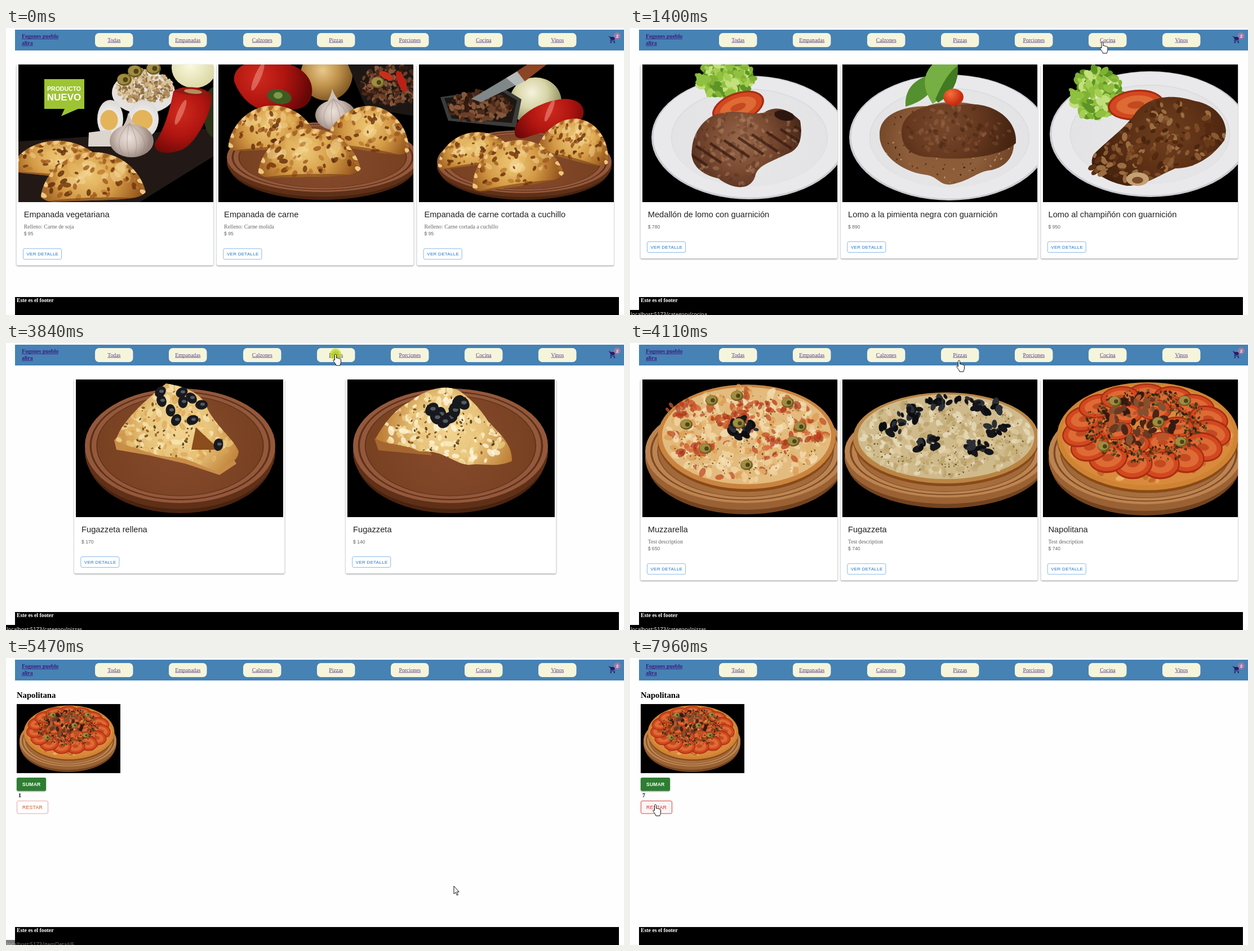
Animation of 1097 by 511 pixels, one loop 8 s. Source, as an HTML page with a canvas:

```html
<!DOCTYPE html>
<html lang="es">
<head>
<meta charset="utf-8">
<title>Menú</title>
<style>
html, body { margin: 0; width: 100%; height: 100%; overflow: hidden; background: #fff; }
canvas { display: block; }
</style>
</head>
<body>
<canvas id="stage" width="1097" height="511"></canvas>
<script>
const LOOP = 8000;
const SERIF = '"Liberation Serif", serif', SANS = '"Liberation Sans", sans-serif';
let g = document.getElementById('stage').getContext('2d');
let seed = 1;
const random = () => (seed = seed * 16807 % 2147483647) / 2147483647;
const clamp = v => Math.max(0, Math.min(1, v));

// ---- drawing helpers ----
function oval(x, y, rx, ry, color, turn = 0) {
  g.beginPath();
  g.ellipse(x, y, rx, ry, turn, 0, 7);
  g.fillStyle = color;
  g.fill();
}
function shape(d, color) {
  g.fillStyle = color;
  g.fill(new Path2D(d));
}
function glow(x, y, r, ...colors) {
  const fill = g.createRadialGradient(x, y, 0, x, y, r);
  colors.forEach((c, i) => fill.addColorStop(i / (colors.length - 1), c));
  return fill;
}
function scatter(n, x, y, rx, ry, size, colors) {
  for (let i = 0; i < n; i++) {
    const a = random() * 6.283, r = Math.sqrt(random()), s = size * (.5 + random() * .7);
    oval(x + rx * r * Math.cos(a), y + ry * r * Math.sin(a), s, s * .6, colors[i % colors.length], random() * 3);
  }
}
function clipped(d, draw) {
  g.save();
  g.clip(new Path2D(d));
  draw();
  g.restore();
}
function box(x, y, w, h, r, fill, stroke) {
  g.beginPath();
  g.roundRect(x, y, w, h, r);
  if (fill) { g.fillStyle = fill; g.fill(); }
  if (stroke) { g.strokeStyle = stroke; g.lineWidth = .9; g.stroke(); }
}
function text(s, x, y, font, color, { align = 'left', line = false, spacing = 0 } = {}) {
  g.font = font;
  g.fillStyle = color;
  g.textAlign = align;
  g.letterSpacing = spacing + 'px';
  g.fillText(s, x, y);
  if (line) {
    const w = g.measureText(s).width;
    g.fillRect(align === 'center' ? x - w / 2 : x, y + 1, w, .8);
  }
}

// ---- food ----
const BLACK_OLIVE = ['#15161a', '#2c2f36', '#0c0d10'];
const MEAT = ['#4a2a1a', '#6b4028', '#321a10', '#85573a'];
const HERBS = ['#7a5a2c', '#5d4a22', '#94632b'];
// side, lower side, rim, groove, face centre, face edge
const DARK_WOOD = ['#5f3018', '#4a230f', '#94583a', '#5d301c', '#874a2d', '#75401f'];
const LIGHT_WOOD = ['#9a6234', '#74431f', '#bd8450', '#7d4a26', '#b07845', '#9c6436'];

function board(x, y, rx, ry, depth, [side, low, rim, groove, centre, edge]) {
  oval(x, y + depth, rx * .98, ry, low);
  oval(x, y + depth * .6, rx, ry, side);
  oval(x, y, rx, ry, rim);
  oval(x, y, rx * .95, ry * .95, groove);
  oval(x, y, rx * .93, ry * .93, rim);
  oval(x, y, rx * .88, ry * .88, groove);
  oval(x, y, rx * .87, ry * .87, glow(x, y, rx, centre, edge));
}
function plate(x, y, rx, ry) {
  oval(x, y, rx, ry, '#cbccd0');
  oval(x, y - 1, rx * .98, ry * .98, '#e9e9eb');
  oval(x, y, rx * .8, ry * .79, '#dcdde0');
  oval(x, y + 1, rx * .79, ry * .78, glow(x, y, rx, '#e8e8e9', '#e2e2e4'));
}
function empanada(x, y, w, h, turn = 0) {
  const body = 'M0 45C3 20 26 0 50 0C76 0 96 20 100 43C94 50 82 49 70 50H26C16 50 6 52 0 45Z';
  g.save();
  g.translate(x, y);
  g.rotate(turn);
  g.scale(w / 100, h / 50);
  g.translate(-50, -25);
  shape(body, glow(46, 24, 55, '#edc878', '#d49a45', '#8f4f18'));
  clipped(body, () => {
    scatter(20, 50, 22, 40, 15, 7, ['#f7e2a966', '#e9bc6466']);
    scatter(46, 50, 28, 47, 22, 3.6, ['#7a3b10dd', '#a05a1ecc', '#5f2b0bcc', '#b9772fbb']);
    for (let i = 0; i <= 22; i++) {
      const a = Math.PI * (1 + i / 22), cx = 50 + 48 * Math.cos(a), cy = 43 + 41 * Math.sin(a);
      oval(cx, cy, 4, 2.4, i % 2 ? '#a9692a' : '#eec681', a + .6);
    }
    oval(50, 52, 50, 5, '#70390f99');
  });
  g.restore();
}
function olive(x, y, r = 10) {
  oval(x, y, r, r * .85, '#6f5f22');
  oval(x - 1, y - 1, r * .85, r * .7, '#a08d42');
  oval(x + 2, y, r * .35, r * .35, '#4d4316');
}
function pepper(d, x, y, r) {
  shape(d, glow(x, y, r, '#cf2a1e', '#b01510', '#650706'));
  clipped(d, () => oval(x, y, r * .06, r * .28, '#ef9a8a88', .4));
}
function garlic(x, y, r) {
  shape(`M${x - 6} ${y - r * 1.3}Q${x} ${y - r * .7} ${x + r} ${y}H${x - r}Q${x - 10} ${y - r * .6} ${x - 6} ${y - r * 1.3}Z`, '#cdbfb4');
  oval(x, y, r, r * .75, glow(x - 5, y - 6, r, '#ebe2dc', '#d0c1b8', '#97857d'));
  g.strokeStyle = '#9a858066';
  g.lineWidth = 1.5;
  for (const k of [-.6, -.2, .25, .65]) g.stroke(new Path2D(`M${x - 4} ${y - r * .8}Q${x + r * k * 1.5} ${y} ${x + r * k * .6} ${y + r * .65}`));
}
function lettuce(x, y, rx, ry) {
  scatter(190, x, y, rx, ry, 9, ['#7fb234', '#a4cf52', '#5d9425', '#c2e07c', '#8fc03f']);
}
function tomatoSlice(x, y, rx, ry, turn = 0) {
  oval(x, y, rx, ry, '#a82c12', turn);
  oval(x, y, rx * .93, ry * .88, '#d2481f', turn);
  oval(x, y, rx * .7, ry * .62, '#de6a35', turn);
  oval(x, y, rx * .3, ry * .24, '#c24a20', turn);
}
function roundPizza(x, y, rx, ry, edge, cheese) {
  oval(x, y + 5, rx, ry, '#8a4a18');
  oval(x, y, rx, ry, edge);
  oval(x, y - 2, rx * .95, ry * .93, cheese);
}

function photo(draw) {
  const canvas = document.createElement('canvas'), main = g;
  canvas.width = 368;
  canvas.height = 245;
  g = canvas.getContext('2d');
  seed = 77;
  g.fillRect(0, 0, 368, 245);
  draw();
  g = main;
  return canvas;
}

const veggie = photo(() => {
  shape('M0 137L368 112V150L215 245H0Z', '#221916');
  oval(312, 6, 40, 36, glow(305, 0, 45, '#fbfae0', '#dcd9a4'));
  oval(348, 85, 20, 45, '#2b3418');
  oval(222, 50, 56, 38, '#e4e1de');
  scatter(330, 224, 40, 50, 30, 4, ['#cdb083', '#b08d5c', '#dcc79d', '#8f6f43']);
  [[207, 12], [188, 27], [240, 7]].forEach(([x, y]) => olive(x, y, 13));
  [[163, 97, 23], [222, 97, 27]].forEach(([x, y, r]) => {
    oval(x, y, r, 34, glow(x, y, 40, '#fbfafa', '#d5d2cf'));
    oval(x - 2, y + 2, r * .68, 18, '#e4b45a');
  });
  pepper('M275 48C285 38 325 36 341 52C350 72 318 140 290 152C262 162 240 158 242 140C258 118 268 85 275 48Z', 288, 85, 85);
  shape('M277 48Q305 35 339 52Q312 60 277 48Z', '#8f1a12');
  oval(310, 48, 16, 4, '#b98a5c', .1);
  shape('M125 121L165 116V146H124Z', '#dcd5cd');
  garlic(201, 136, 39);
  empanada(76, 168, 172, 64, .1);
  empanada(132, 199, 186, 86, -.03);
  shape('M46 26H117V79H106L76 92L82 79H46Z', '#9dc432');
  text('PRODUCTO', 81, 47, `bold 10.5px ${SANS}`, '#fff', { align: 'center' });
  text('NUEVO', 81, 64, `bold 17px ${SANS}`, '#fff', { align: 'center' });
});

const beef = photo(() => {
  board(185, 165, 170, 62, 14, DARK_WOOD);
  oval(192, 18, 46, 46, glow(185, 10, 55, '#e8c98c', '#c2954e', '#845a26'));
  pepper('M28 30C25 5 50-10 95-5C140-5 170 20 166 52C162 78 140 84 112 78C85 92 45 75 28 30Z', 70, 22, 95);
  oval(108, 57, 22, 13, '#3f5a22', .2);
  oval(106, 55, 8, 6, '#7d9a45');
  shape('M230 0H368V95L262 78Z', '#1c1715');
  scatter(270, 308, 36, 55, 36, 5, MEAT);
  olive(283, 32, 12);
  oval(325, 30, 20, 7, '#bb2115', 1.2);
  oval(298, 20, 14, 6, '#c9301c', .5);
  garlic(208, 90, 36);
  empanada(95, 112, 158, 78, -.05);
  empanada(270, 114, 148, 80, .16);
  empanada(161, 157, 182, 86, -.02);
});

const knifeCut = photo(() => {
  board(187, 173, 155, 56, 12, DARK_WOOD);
  oval(207, 66, 46, 43, glow(200, 50, 55, '#f4f2dc', '#d8d5a8', '#908d5e'));
  shape('M38 58L150 42L182 62L172 112L52 100Z', '#3b3d3c');
  shape('M45 60L146 47L174 64L165 104L58 96Z', '#1d1613');
  scatter(200, 108, 75, 56, 26, 6, MEAT);
  shape('M93 61L178 10L190 28L110 67Z', '#7f8789');
  shape('M155 24L178 10L190 28L172 38Z', '#b4b9ba');
  shape('M174 12L195-2L232-4L188 30Z', '#8b4424');
  pepper('M172 128C160 100 205 70 245 63C280 55 300 75 290 95C275 115 230 118 205 125C190 130 180 135 172 128Z', 232, 82, 75);
  empanada(98, 150, 136, 58, -.14);
  empanada(280, 134, 128, 74, .25);
  empanada(172, 176, 164, 82, -.14);
});

const steak = photo(() => {
  const meat = 'M88 150C90 120 112 88 145 86C170 80 190 90 215 86C240 70 262 82 280 100C285 130 280 152 255 160C225 175 203 180 200 200C190 226 160 222 135 203C100 195 84 175 88 150Z';
  plate(190, 130, 174, 110);
  lettuce(147, 24, 50, 32);
  tomatoSlice(170, 76, 48, 26, -.35);
  shape(meat, glow(175, 135, 110, '#98694c', '#7a4a31', '#482718'));
  clipped(meat, () => {
    scatter(220, 185, 145, 105, 75, 5, ['#a6785a88', '#5c341f88', '#b78c6a66', '#70432c88']);
    g.strokeStyle = '#371b10bb';
    g.lineWidth = 5;
    for (let i = 0; i < 9; i++) g.stroke(new Path2D(`M${70 + i * 25} ${150 - i * 5}l45 30`));
  });
  oval(252, 91, 18, 9, '#2c1710', .2);
});

const pepperSauce = photo(() => {
  const sauce = 'M66 125C65 90 105 74 150 74C200 55 285 75 300 112C310 145 305 178 265 188C240 190 230 205 200 212C172 220 172 198 145 196C105 190 65 160 66 125Z';
  plate(190, 130, 178, 112);
  shape(sauce, glow(180, 140, 135, '#8a5a36', '#8e5e3b', '#6a3f22'));
  clipped(sauce, () => scatter(110, 185, 140, 120, 72, 2, ['#5a351d', '#b98a61', '#3e2413']));
  shape('M105 120C105 80 160 65 205 72C270 62 312 100 308 140C280 165 210 172 160 165C125 165 105 150 105 120Z', glow(180, 105, 120, '#76482b', '#67391f', '#472512'));
  scatter(110, 205, 117, 92, 42, 5, ['#8b5a3855', '#42220f66', '#a5724d55']);
  ['M112 66Q115 25 168 16Q165 60 112 75Z', 'M160 70Q130 25 165-5H205Q205 45 160 70Z', 'M165 62Q185 15 205 2Q208 45 170 68Z'].forEach((d, i) => shape(d, ['#54902f', '#76b044', '#417a22'][i]));
  oval(197, 58, 18, 15, glow(192, 52, 20, '#f5713c', '#c92c10'));
});

const mushroom = photo(() => {
  const meat = 'M90 160C120 130 150 110 165 85C190 55 230 52 270 65C310 72 333 105 322 135C300 165 270 185 235 185C200 200 182 215 150 216C115 210 75 190 90 160Z';
  plate(190, 124, 178, 112);
  lettuce(95, 52, 45, 44);
  tomatoSlice(165, 72, 50, 27, -.1);
  shape(meat, glow(220, 125, 130, '#6e3f1f', '#5e3116', '#41200d'));
  clipped(meat, () => scatter(220, 205, 138, 125, 80, 7, ['#8a5a33', '#4b260f', '#9b6e42', '#693919', '#54290f', '#7c4a25']));
  scatter(24, 130, 178, 50, 25, 7, ['#7a4a25', '#9b6d40', '#5a2f14']);
  oval(168, 204, 20, 12, '#c4a074');
  oval(168, 206, 10, 6, '#7a4c28');
});

function slice(outline, cheeseColors, cx, cy) {
  shape(outline, glow(cx, cy, 120, '#f2d592', '#e7c27a', '#bf8138'));
  clipped(outline, () => {
    scatter(200, cx, cy, 115, 75, 7, cheeseColors);
    scatter(70, cx, cy - 5, 95, 60, 3, HERBS);
  });
}
function blackOlives(points, r = 10) {
  points.forEach(([x, y]) => {
    oval(x, y, r * 1.1, r * .85, '#17191e', x);
    oval(x + 2, y - 1, r * .4, r * .28, '#545a63');
  });
}

const stuffedSlice = photo(() => {
  board(185, 118, 169, 102, 18, DARK_WOOD);
  shape('M68 108L90 85L265 115L285 150L255 170L195 150L130 135L72 125Z', '#c98d48');
  slice('M70 112C78 80 110 48 160 7C190 12 222 22 232 48C245 80 280 105 289 128C287 150 270 145 255 164C230 160 215 145 180 138C145 140 115 122 70 112Z', ['#f7e4aecc', '#e9c274cc', '#f4d791cc', '#dca555aa'], 180, 85);
  shape('M213 85L255 125L205 125Z', '#8a4d1b');
  blackOlives([[152, 38], [188, 23], [190, 40], [223, 45], [168, 55], [178, 72], [207, 72], [253, 116], [150, 22], [205, 33]]);
});

const onionSlice = photo(() => {
  board(183, 118, 173, 102, 18, DARK_WOOD);
  shape('M48 105L140 108L150 135L55 126Z', '#a5672f');
  slice('M50 105C62 85 80 55 110 40C135 20 165 8 195 18C215 30 235 50 250 75C275 100 293 118 292 145C265 158 240 148 214 152C180 145 170 125 128 128C95 112 70 118 50 105Z', ['#f8e9bbdd', '#edcb83cc', '#f6dc9bcc', '#fff5d9cc'], 180, 88);
  blackOlives([[150, 53], [165, 62], [182, 68], [172, 75], [190, 55], [197, 40], [205, 42], [158, 68]], 12);
});

const muzzarella = photo(() => {
  board(183, 128, 178, 92, 20, LIGHT_WOOD);
  roundPizza(185, 102, 158, 93, '#c98440', '#e3bb7e');
  scatter(330, 185, 98, 142, 82, 9, ['#f0d6a2cc', '#e2b671cc', '#c04a24bb', '#f4e0b6cc', '#dc9a52bb', '#efd09acc']);
  for (const [x, y] of [[70, 52], [150, 75], [250, 45], [230, 120], [290, 100], [95, 125], [195, 55]]) scatter(16, x, y, 34, 15, 7, ['#b83a1bbb', '#cf5a2bbb', '#a93016aa']);
  scatter(220, 185, 98, 138, 80, 1.6, HERBS);
  scatter(26, 178, 88, 28, 17, 8, BLACK_OLIVE);
  [[123, 37], [168, 29], [258, 41], [78, 80], [112, 123], [185, 152], [268, 110], [280, 84], [171, 78]].forEach(([x, y]) => olive(x, y, 11));
});

const fugazzeta = photo(() => {
  board(184, 128, 180, 82, 19, LIGHT_WOOD);
  roundPizza(184, 104, 165, 81, '#b98546', '#cfba8c');
  scatter(360, 184, 102, 152, 70, 7, ['#dccb9fcc', '#c6ad76cc', '#e6dcbdcc', '#b99f69bb']);
  scatter(170, 184, 100, 150, 70, 1.6, HERBS);
  [[167, 40], [222, 43], [92, 85], [122, 60], [152, 115], [242, 120], [277, 90], [257, 50]].forEach(([x, y]) => scatter(13, x, y, 24, 13, 8.5, BLACK_OLIVE));
});

const napolitana = photo(() => {
  board(182, 130, 172, 92, 20, LIGHT_WOOD);
  roundPizza(186, 101, 161, 96, '#cf8434', '#d98a3c');
  scatter(160, 186, 98, 145, 84, 9, ['#e3a653cc', '#c4642acc', '#e9b86ccc', '#b9552299']);
  for (let i = 0; i < 15; i++) {
    const a = i * .419 - 1.57;
    tomatoSlice(184 + 116 * Math.cos(a), 89 + 62 * Math.sin(a), 35, 24 + 4 * Math.sin(a), .25 * Math.cos(a));
  }
  for (let i = 0; i < 6; i++) tomatoSlice(183 + 55 * Math.cos(i), 85 + 32 * Math.sin(i), 30, 19);
  for (let i = 0; i < 11; i++) scatter(46, 183 + 85 * Math.cos(i * .57), 82 + 52 * Math.sin(i * .57), 28, 15, 3, ['#2c2410', '#4a3a18', '#6a3b17', '#8e6a32']);
  scatter(75, 172, 72, 68, 42, 9, ['#4b2416', '#6a3a22', '#351a10', '#84502e', '#b9552a']);
  [[128, 39], [252, 38], [205, 76], [108, 119], [245, 111]].forEach(([x, y]) => olive(x, y, 11));
});

// ---- page ----
const LINKS = ['Todas', 'Empanadas', 'Calzones', 'Pizzas', 'Porciones', 'Cocina', 'Vinos'];
const three = i => [18.7 + 355.4 * i, 349.5];
const two = i => [121 + 482 * i, 373.5];
// start time, column layout, cards: photo, title, price, description
const PAGES = [
  [0, three, [
    [veggie, 'Empanada vegetariana', 95, 'Relleno: Carne de soja'],
    [beef, 'Empanada de carne', 95, 'Relleno: Carne molida'],
    [knifeCut, 'Empanada de carne cortada a cuchillo', 95, 'Relleno: Carne cortada a cuchillo']]],
  [1050, three, [
    [steak, 'Medallón de lomo con guarnición', 780],
    [pepperSauce, 'Lomo a la pimienta negra con guarnición', 890],
    [mushroom, 'Lomo al champiñón con guarnición', 950]]],
  [2450, two, [[stuffedSlice, 'Fugazzeta rellena', 170], [onionSlice, 'Fugazzeta', 140]]],
  [3930, three, [
    [muzzarella, 'Muzzarella', 650, 'Test description'],
    [fugazzeta, 'Fugazzeta', 740, 'Test description'],
    [napolitana, 'Napolitana', 740, 'Test description']]]
];
const DETAIL_AT = 5200;
const ADDS = [6700, 6980, 7190, 7340, 7500, 7640];
const CLICKS = [880, 2340, 3770, 5050, ...ADDS];
const STATUS = [[880, 2050, 'category/cocina'], [2000, 3300, 'category/porciones'], [3250, 4170, 'category/pizzas'], [4700, 5350, 'itemDetail/6']];
const ROUTE = [
  [70, 1028, 450], [560, 815, 36], [750, 838.5, 25], [1790, 838.5, 25], [2140, 692, 24], [2950, 692, 24],
  [3500, 585, 20], [4020, 585, 20], [4110, 584, 31], [4520, 820, 273], [4590, 820, 273], [4860, 795, 406],
  [5860, 795, 406], [6620, 29, 220], [7640, 31, 221], [7900, 45, 261], [LOOP, 45, 261]
];

function header() {
  g.fillStyle = '#4682b4';
  g.fillRect(16, 3, 1081, 37);
  text('Fogones pueblo', 28, 18, `bold 9.8px ${SERIF}`, '#3d1a80', { line: true });
  text('alira', 28, 30, `bold 9.8px ${SERIF}`, '#3d1a80', { line: true });
  LINKS.forEach((name, i) => {
    const x = Math.round(158.3 + i * 131.1);
    box(x, 9, 67.5, 25, 7, '#f5f5dc');
    text(name, x + 33.8, 24.5, `9.8px ${SERIF}`, '#60408a', { align: 'center', line: true });
  });
  g.save();
  g.translate(1069.5, 13.5);
  g.scale(.61, .61);
  shape('M1 2H4.3L5.2 4H20Q21.5 4 21 5.4L17.3 12Q16.7 13 15.6 13H8.1L7 15H19V17H7Q4 17 5 14.4L6.6 12L3 4H1Z', '#2b1766');
  oval(7, 20, 2, 2, '#2b1766');
  oval(17, 20, 2, 2, '#2b1766');
  g.restore();
  oval(1085, 14, 6.2, 6.2, '#9a7aa4');
  text('2', 1085, 16.8, `bold 7.5px ${SANS}`, '#fff', { align: 'center' });
}

function card([picture, title, price, description], [x, width]) {
  const shift = description ? 12.3 : 0, visible = Math.min(368, Math.round(width - 3.3));
  g.save();
  g.shadowColor = 'rgba(0,0,0,.45)';
  g.shadowBlur = 2.5;
  g.shadowOffsetY = 1;
  box(x, 65, width, 345.5 + shift, 2.5, '#fff');
  g.restore();
  g.drawImage(picture, 0, 0, visible, 245, Math.round(x + 3.3), 65, visible, 245);
  text(title, x + 13, 336.7, `14.7px ${SANS}`, '#222');
  if (description) text(description, x + 13, 356.5, `9.8px ${SERIF}`, '#666');
  text('$ ' + price, x + 13, 356.5 + shift, `8.6px ${SANS}`, '#666');
  box(x + 11.8, 380.5 + shift, 68, 19, 2.5, null, '#7fb2e4');
  text('VER DETALLE', x + 17.8, 392.8 + shift, `8px ${SANS}`, '#1976d2', { spacing: .28 });
}

function detail(t, x, y) {
  const overAdd = y < 237 && x < 71, overRemove = y > 254 && x < 75;
  text('Napolitana', 19, 71, `bold 14.7px ${SERIF}`, '#000');
  g.drawImage(napolitana, 19, 82, 184, 122.5);
  g.save();
  g.shadowColor = 'rgba(0,0,0,.45)';
  g.shadowBlur = overAdd ? 4 : 2;
  g.shadowOffsetY = 1;
  box(19, 213, 52, 23.5, 2.5, overAdd ? '#1b5e20' : '#2e7d32');
  g.restore();
  text('SUMAR', 29, 228, `bold 8.6px ${SANS}`, '#fff', { spacing: .2 });
  text(1 + ADDS.filter(at => t >= at).length, 22, 248, `bold 9.8px ${SERIF}`, '#000');
  box(19.5, 254.5, 55, 22.5, 2.5, overRemove ? '#fdf4f4' : null, overRemove ? '#d32f2f' : '#e99797');
  text('RESTAR', 29, 269, `8.6px ${SANS}`, overRemove ? '#cf3030' : '#cc5526', { spacing: .28 });
}

function footer(t) {
  g.fillStyle = '#000';
  g.fillRect(16, 479, 1072, 32);
  text('Este es el footer', 19, 488, `bold 9.8px ${SERIF}`, '#fff');
  STATUS.forEach(([from, to, path]) => {
    if (t < from) return;
    g.globalAlpha = clamp(1 - (t - to) / 240);
    g.fillStyle = '#000';
    g.fillRect(0, 502, 200, 9);
    text('localhost:5173/' + path, 1, 512.5, '9.4px "Open Sans", sans-serif', '#fff');
    g.globalAlpha = 1;
  });
}

function pointerAt(t) {
  const i = Math.max(1, ROUTE.findIndex(p => p[0] > t));
  const [t0, x0, y0] = ROUTE[i - 1], [t1, x1, y1] = ROUTE[i];
  const p = clamp((t - t0) / (t1 - t0)), k = p * p * (3 - 2 * p);
  return [x0 + (x1 - x0) * k, y0 + (y1 - y0) * k];
}

function pointer(t, x, y) {
  if (t < 70) return;
  const overLink = y < 34 && (x - 158.3) % 131.1 < 67.5
    || t < DETAIL_AT && y > 392 && y < 412 && x < 810
    || t > DETAIL_AT && x < 75 && (y > 213 && y < 237 || y > 254 && y < 277);
  if (CLICKS.some(at => t >= at && t < at + 150)) {
    oval(x, y, 10, 10, 'rgba(190,215,20,.75)');
    oval(x, y, 6, 6, 'rgba(150,180,10,.35)');
  }
  g.save();
  g.translate(x, y);
  const outline = new Path2D(overLink
    ? 'M-1.5 1.5C-1.5-.5 1.5-.5 1.5 1.5V7C2 6 4 6 4.2 7.5C5 6.7 6.7 7 6.9 8.3C7.8 7.6 9.5 8 9.5 10V14C9.5 17 8 17.5 8 20H1C.5 17-2.5 14.5-4 11.5C-4.5 10-3 9-1.5 11Z'
    : 'M0 0V14L3.2 11.2L5.4 16.4L7.5 15.5L5.3 10.4H9.2Z');
  g.fillStyle = '#fff';
  g.fill(outline);
  g.strokeStyle = '#111';
  g.lineWidth = 1;
  g.stroke(outline);
  g.restore();
}

function render(t) {
  const [x, y] = pointerAt(t);
  g.fillStyle = '#fefefe';
  g.fillRect(0, 0, 1097, 511);
  header();
  if (t >= DETAIL_AT) detail(t, x, y);
  else {
    const [, layout, cards] = PAGES.findLast(page => t >= page[0]);
    cards.forEach((item, i) => card(item, layout(i)));
  }
  footer(t);
  pointer(t, x, y);
}

let start;
requestAnimationFrame(function tick(now) {
  start ??= now;
  render((now - start) % LOOP);
  requestAnimationFrame(tick);
});
</script>
</body>
</html>
```
